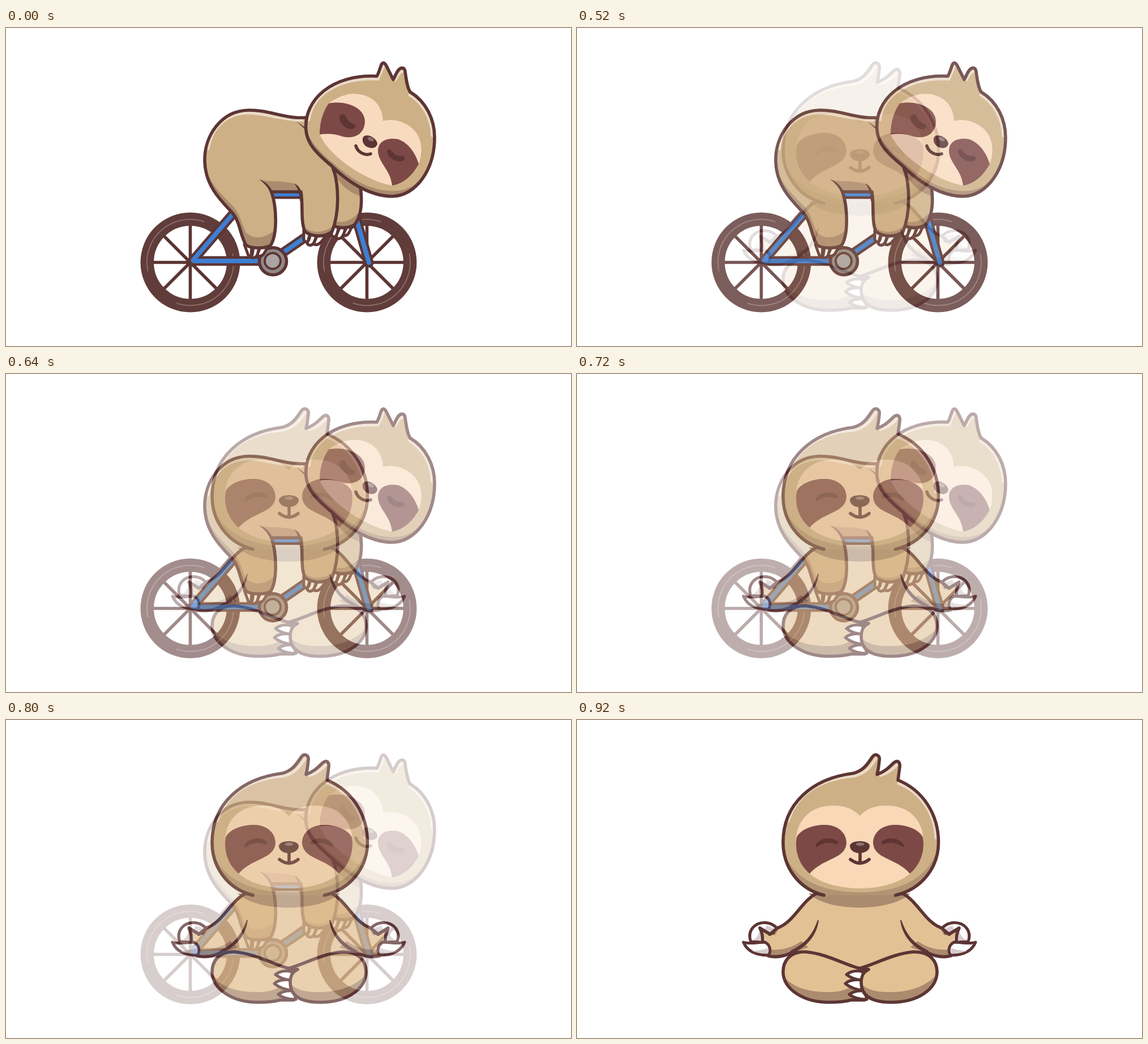
Recreate the animation shown at these times as an HTML page. Size 998x561 px, loop 1.28 s.

```html
<!DOCTYPE html>
<html lang="en">
<head>
<meta charset="utf-8">
<title>Sloth cross-fade</title>
<style>
html, body { margin: 0; height: 100%; overflow: hidden; background: #fff; }
svg { display: block; width: 100%; height: 100%; }
.line { fill: none; stroke: #5c3534; stroke-width: 5.6; stroke-linecap: round; stroke-linejoin: round; }
.fur { fill: #ceb086; }
.warm { fill: #e2c194; }
.shade { fill: #ab8b6e; }
.glow { fill: none; stroke: #ebdac7; stroke-width: 5; stroke-linecap: round; }
.patch { fill: #7d4946; }
.dark { fill: #5c3534; }
.lid { fill: #5f3534; }
.claw { fill: #fff; stroke: #5c3534; stroke-width: 5; stroke-linejoin: round; }
</style>
</head>
<body>
<svg viewBox="0 0 998 561">
<defs>
  <g id="wheel" class="line">
    <path d="M-66 0H66M0-66V66M-47-47L47 47M-47 47L47-47"/>
    <circle r="76.2" style="stroke:#603c3a;stroke-width:23.5"/>
    <path d="M-75 15A76 76 0 0 1 24-72M75-15A76 76 0 0 1-24 72" style="stroke:#8b6965;stroke-width:2"/>
  </g>
  <path id="tubes" d="M400 329L331 409Q329 411 334 411H452M465 293H525M475 406L545 358M617 330L641 414"/>

  <path id="back" d="M560 160C545 156 532 159 512 158C484 156 458 144 428 145C380 146 350 190 351 235C352 278 379 304 398 324C414 341 413 365 424 383C435 390 457 389 467 384C480 364 478 316 469 289H521C525 315 520 340 528 359C541 369 563 370 576 359C589 326 588 281 579 250L600 200Z"/>
  <path id="farArm" d="M580 250L626 280C630 309 627 332 616 347C604 354 588 354 577 348Z"/>
  <path id="headA" d="M530 181C525 126 577 81 655 85C659 79 661 68 664 63Q668 59 672 67L684 91C689 82 691 74 697 71Q704 69 705 77C707 92 709 106 714 113C742 130 757 161 757 193C757 250 724 297 681 297C642 296 604 272 575 243C546 219 532 203 530 181Z"/>
  <clipPath id="backClip"><use href="#back"/></clipPath>
  <clipPath id="farClip"><use href="#farArm"/></clipPath>
  <clipPath id="headAClip"><use href="#headA"/></clipPath>

  <path id="headB" d="M436 309C391 298 364 259 364 216C364 147 416 103 488 94C507 89 514 76 521 66C526 57 536 62 534 71C533 82 532 89 530 96C545 91 552 82 560 75C567 70 571 75 570 83L567 106C611 124 638.5 166 638.5 216C638.5 259 610 298 563 309"/>
  <clipPath id="headBClip"><use href="#headB"/></clipPath>
  <path id="leg" d="M499 438C522 433 558 412 594 409C626 409 636 427 636 445C635 475 602 498 555 498C522 498 502 488 502 463C502 450 507 444 515 440Z"/>
  <path id="farLeg" d="M499 438C476 433 440 412 404 409C375 408 364 426 364 445C365 475 400 498 445 498C462 498 473 497 484 494H508V440Z"/>
  <clipPath id="legClip"><use href="#leg"/></clipPath>
  <clipPath id="farLegClip"><use href="#farLeg"/></clipPath>

  <g id="halfBody">
    <path class="claw" d="M307 391C300 372 314 357 332 357.5C345 358 352 365 356 371L350 392Z"/>
    <path fill="#d5cccb" d="M335 363Q348 366 350 371L341 376L331 371ZM310 388Q319 385 322 374Q328 382 327 390Z"/>
    <path class="warm" d="M425 304C396 320 383 357 354 367L341 378L327 371C330 384 335 387 330 392C341 397 343 407 338 416C352 420 370 416 381 410L420 420L501 442V304Z"/>
    <path class="shade" d="M341 405C365 407 382 400 396 390L409 401L380 411C366 417 353 418 339 416ZM409 306H501V331C468 331 430 325 409 306Z"/>
    <path class="shade" d="M354 367L341 378L348 380Q354 376 354 367Z"/>
    <path class="line" d="M436 309L423 306C396 320 383 357 354 367L341 378L323 367C328 377 328 384 328 391M340 378L347 375M338 416C352 420 370 416 381 409"/>
    <path class="dark" d="M427 353C424 379 407 400 380 412L377 407C402 395 416 380 425 353Z"/>
    <path class="claw" d="M294 392C305 396 318 392 332 392C342 397 343 408 338 415C317 415 301 409 294 392Z"/>
    <path fill="#d5cccb" d="M309 407Q326 407 338 402L337 412Q321 413 309 407Z"/>
  </g>
  <g id="halfFace">
    <path fill="#f8d8b7" d="M501 171C487 153 463 149 440 152C406 156 386 184 387 216C389 240 399 260 411 271C433 290 467 297 501 297Z"/>
    <path class="patch" d="M388 207C395 192 419 184 441 185C465 187 476 202 476 217C474 246 435 243 411 271C393 256 384 232 388 207Z"/>
    <path class="lid" d="M421 222C425 208 452 204 461 215Q463 220 457 219C445 215 437 217 427 222Q422 226 421 222Z"/>
  </g>
</defs>

<g id="ride">
  <use href="#wheel" x="325.5" y="413.5"/>
  <use href="#wheel" x="637.5" y="413.5"/>
  <use href="#tubes" class="line" style="stroke-width:17"/>
  <use href="#tubes" class="line" style="stroke:#3e7fd3;stroke-width:8"/>
  <circle class="line" cx="471.5" cy="411.5" r="24" style="fill:#938a88"/>
  <circle class="line" cx="471" cy="411" r="14" style="fill:#aaa5a3;stroke-width:4"/>

  <path class="claw" d="M421 382L428 401Q431 407 435 400L437 387ZM434 386L433 402Q436 409 443 402L449 387ZM447 387L444 401Q449 405 455 399L464 384Z"/>
  <path class="claw" d="M576 348L575 366Q579 371 584 365L590 351ZM588 351L583 369Q587 375 594 368L602 351ZM600 351L596 366Q602 368 606 361L612 348Z"/>
  <path class="claw" d="M526 357L526 374Q531 381 535 374L538 364ZM537 363L532 380Q537 387 544 379L550 366ZM549 366L543 381Q550 385 557 377L567 364Z"/>

  <use href="#farArm" class="fur"/>
  <g clip-path="url(#farClip)">
    <path class="shade" d="M570 336C588 347 606 343 622 327V360H570ZM584 250L630 280V298C610 292 594 280 584 264Z"/>
  </g>
  <use href="#farArm" class="line"/>

  <use href="#back" class="fur"/>
  <g clip-path="url(#backClip)">
    <path class="shade" d="M345 232C358 273 380 293 399 312C416 330 416 348 425 362C440 374 460 371 477 354V395H400L340 300ZM520 345C536 364 563 366 590 340V375H520ZM449 268C464 272 491 268 513 276C520 281 523 289 525 304L519 289H470Z"/>
    <path class="glow" d="M357 213C364 171 394 150 428 150C456 150 480 161 523 163"/>
  </g>
  <use href="#back" class="line"/>
  <path class="dark" d="M447 267Q462 271 472 290L467 292Q462 277 447 267ZM509 274Q524 281 524 305H519Q519 286 509 274ZM513 165C547 186 575 218 582 252L577 255C569 224 548 194 513 165Z"/>

  <use href="#headA" class="fur"/>
  <g clip-path="url(#headAClip)">
    <path class="shade" d="M525 170C539 205 557 221 581 241C625 280 662 290 694 287C725 283 745 258 757 220V310H620L525 220Z"/>
    <path class="glow" d="M535 162C541 115 591 87 657 90L667 67M688 91Q693 79 701 76M713 118C738 133 752 161 753 190"/>
  </g>
  <use href="#headA" class="line"/>
  <path fill="#f8dbbf" d="M570 133C594 115 619 111 641 122C657 130 665 145 666 164C687 158 711 167 724 184C735 199 737 221 728 242C716 264 700 276 682 278C637 270 573 229 554 188Z"/>
  <path class="patch" d="M570 133C598 127 634 139 634 165C633 192 608 197 590 190C577 186 565 186 554 188C554 164 561 146 570 133ZM682 278C679 249 657 238 657 216C658 198 675 193 692 196C711 202 724 222 729 240C716 264 700 275 682 278Z"/>
  <path class="lid" d="M590 154Q596 149 600 156C604 164 608 167 615 170Q620 174 614 178C600 181 585 165 590 154ZM673 215Q679 212 682 218C688 225 694 226 702 226Q707 230 702 234C689 239 672 228 673 215Z"/>
  <path class="dark" d="M630 194C634 184 654 192 656 204C654 215 639 213 633 206Q629 201 630 194Z"/>
  <ellipse cx="644" cy="196" rx="6" ry="3.2" transform="rotate(24 644 196)" fill="#8b716f"/>
  <path class="line" d="M618 208C621 219 634 226 644 222"/>
</g>

<g id="rest" opacity="0">
  <path fill="#fff" d="M0 0H998V561H0Z"/>
  <use href="#halfBody"/>
  <use href="#halfBody" transform="translate(998) scale(-1 1)"/>

  <use href="#farLeg" class="warm"/>
  <path class="shade" clip-path="url(#farLegClip)" d="M360 445C377 474 414 480 445 480C465 480 476 476 488 468L510 500H360Z"/>
  <use href="#farLeg" class="line"/>
  <path class="claw" d="M505 444C492 441 482 444 476 449Q487 458 505 459ZM505 459C490 457 479 460 474 465Q486 475 505 477ZM508 478C495 477 486 480 481 484Q492 493 512 493Z"/>
  <use href="#leg" class="warm"/>
  <path class="shade" clip-path="url(#legClip)" d="M500 463C513 478 531 480 555 480C589 480 623 468 640 443V505H500Z"/>
  <use href="#leg" class="line"/>

  <use href="#headB" class="fur"/>
  <g clip-path="url(#headBClip)">
    <path fill="#b19473" d="M360 218C375 278 427 304 500 304C573 304 625 278 640 218V312H360Z"/>
    <path class="glow" d="M373 178C388 130 430 104 489 99C512 94 520 80 528 68M536 98Q554 92 566 78M568 112C606 127 632 163 634 208"/>
  </g>
  <use href="#headB" class="line"/>
  <use href="#halfFace"/>
  <use href="#halfFace" transform="translate(999) scale(-1 1)"/>
  <path class="dark" d="M482 222C483 211 516 211 517 222C517 231 506 235 499 235S482 231 482 222Z"/>
  <ellipse cx="500" cy="219" rx="7.5" ry="3" fill="#8d7370"/>
  <path class="line" d="M500 233V249M483 246Q500 259 516 246"/>
</g>
</svg>
<script>
const LOOP = 1280, START = 480, STEP = 40, STEPS = 12;
const rest = document.getElementById("rest");

function draw(now) {
  const t = now % LOOP;
  const step = Math.floor((t - START) / STEP) + 1;
  rest.setAttribute("opacity", Math.min(STEPS, Math.max(0, step)) / STEPS);
  requestAnimationFrame(draw);
}
requestAnimationFrame(draw);
</script>
</body>
</html>
```
